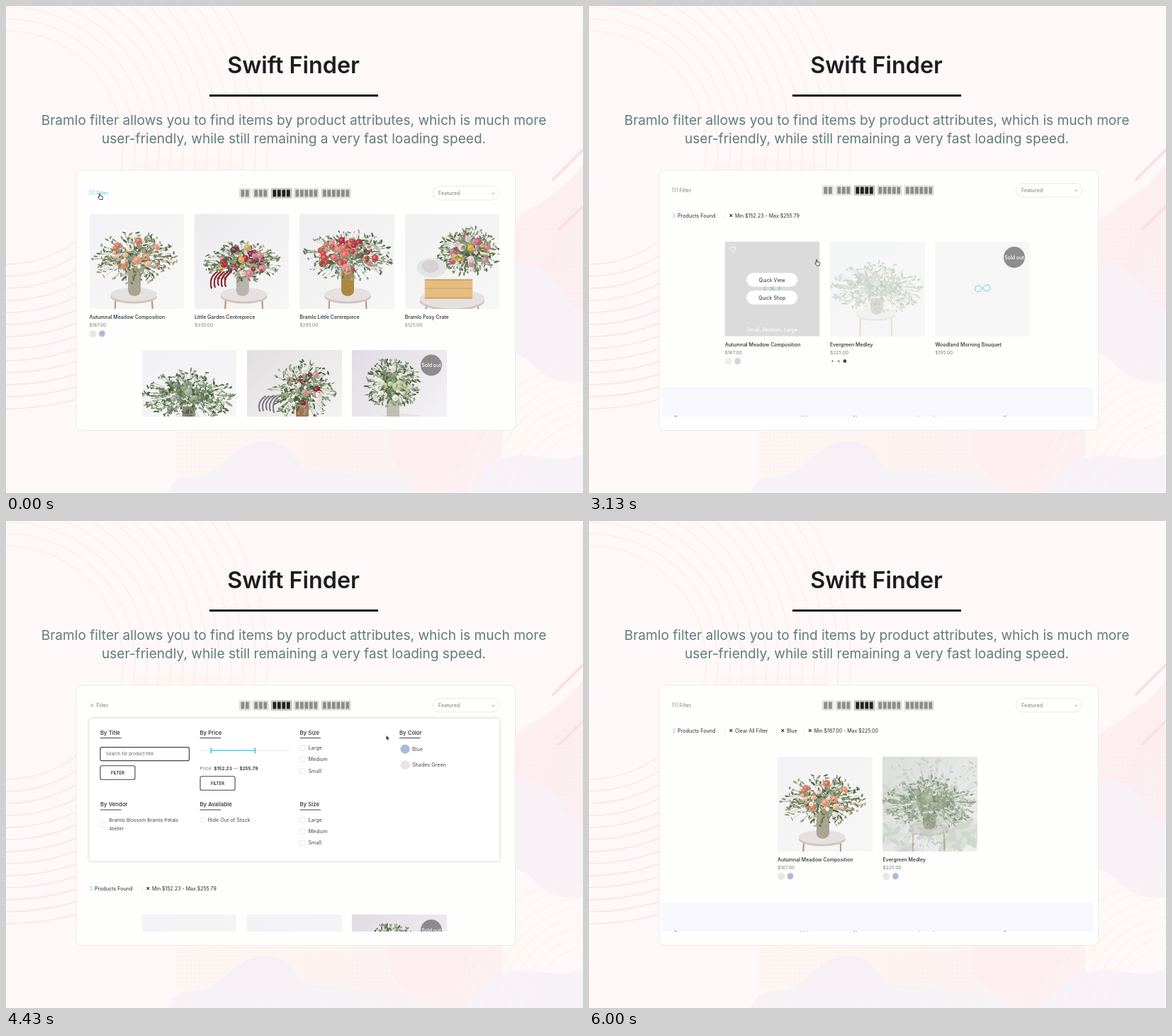
These frames come from a looping animation (814 by 688 pixels, 6.03 s). An HTML page with a canvas:

```html
<!DOCTYPE html>
<html lang="en">
<head>
<meta charset="utf-8">
<title>Swift Finder</title>
<style>
  html, body { margin: 0; width: 100%; height: 100%; overflow: hidden; background: #fef9f8; }
  svg, canvas { position: absolute; left: 0; top: 0; width: 814px; height: 688px; display: block; }
  text { font-family: Inter, sans-serif; text-anchor: middle; }
  .title { font-size: 32.3px; font-weight: 600; fill: #1d1d1f; }
  .lead { font-size: 19.1px; fill: #5f7d7b; }
</style>
</head>
<body>
<svg viewBox="0 0 814 688">
  <defs>
    <linearGradient id="rose" x1="0" y1="0" x2="1" y2="1">
      <stop offset="0" stop-color="#fdf4f2"/><stop offset=".45" stop-color="#fdeeef"/><stop offset="1" stop-color="#f9eff3"/>
    </linearGradient>
    <linearGradient id="peach" x1="0" x2="1">
      <stop offset="0" stop-color="#fdf6f2"/><stop offset=".6" stop-color="#fdf3f2"/><stop offset="1" stop-color="#fdeff2"/>
    </linearGradient>
    <linearGradient id="lilac" x1="0" y1="0" x2="0" y2="1">
      <stop offset="0" stop-color="#f6f0f6"/><stop offset="1" stop-color="#f8f3f6"/>
    </linearGradient>
    <linearGradient id="ringTone" gradientUnits="userSpaceOnUse" x1="0" y1="0" x2="0" y2="580">
      <stop offset="0" stop-color="#fdf1ee"/><stop offset=".4" stop-color="#fdefec"/><stop offset=".75" stop-color="#fce6e7"/>
    </linearGradient>
    <pattern id="dots" width="6" height="6" patternUnits="userSpaceOnUse">
      <circle cx="3" cy="3" r="1" fill="#f6cfd6" opacity=".22"/>
    </pattern>
  </defs>
  <rect width="814" height="688" fill="#fef9f8"/>
  <path d="M165 240C170 218 250 205 330 222L345 240Z" fill="#fef6f3"/>
  <path d="M700 330C715 285 770 285 814 224V470H700Z" fill="url(#rose)"/>
  <path d="M720 300H814V470H720Z" fill="url(#dots)"/>
  <path d="M700 370C740 355 775 380 785 402C795 425 800 425 814 428V530C780 535 760 525 745 508C730 492 715 490 700 490Z" fill="#f8f1f5"/>
  <path d="M240 590H700V688H240Z" fill="url(#peach)"/>
  <path d="M240 600H545V660H240Z" fill="url(#dots)"/>
  <path d="M541 590C538 650 555 668 600 668C650 668 640 640 675 620L700 590Z" fill="#fdeff1"/>
  <path d="M700 688V590H718C740 600 750 640 720 688Z" fill="#fef8f6"/>
  <path d="M228 688C238 655 270 672 295 655C325 630 345 608 380 617C415 628 405 656 435 656C470 655 490 668 530 664C560 662 570 685 600 688Z" fill="url(#lilac)"/>
  <path d="M620 688C660 690 665 645 705 637C745 628 780 650 814 632V688Z" fill="#f6f2f8"/>
  <path d="M772 245L816 201M781 315L816 281" stroke="#fbdfe3" stroke-width="4" stroke-linecap="round"/>
  <g id="rings" fill="none" stroke-width="2"></g>
  <rect x="99" y="232" width="619.5" height="367.5" rx="8" fill="#fefefd" stroke="#eeeaea"/>
  <text class="title" x="405.5" y="94.5">Swift Finder</text>
  <rect x="287" y="125" width="238" height="3" fill="#111"/>
  <text class="lead" x="406" y="167.5">Bramlo filter allows you to find items by product attributes, which is much more</text>
  <text class="lead" x="406" y="194.3">user-friendly, while still remaining a very fast loading speed.</text>
</svg>
<canvas id="stage"></canvas>
<script>
const LOOP = 6030, SIZE = 133.5, CYAN = '#56cfe8', INK = '#2b2b2b', GREY = '#7d7d7d';
const BLUE = '#a9bcd8', PALE = '#e6e6e6';
const FIRST = 2780, SECOND = 5220; // when each result list arrives

const rings = document.getElementById('rings');
function ring(x, y, r, color) {
  const c = document.createElementNS('http://www.w3.org/2000/svg', 'circle');
  Object.entries({ cx: x, cy: y, r, stroke: color }).forEach(([k, v]) => c.setAttribute(k, v));
  rings.append(c);
}
for (let r = 165; r < 380; r += 17) ring(0, 200, r, 'url(#ringTone)');
for (let r = 90; r < 200; r += 14) ring(830, 690, r, '#fcf4ee');

const cv = document.getElementById('stage'), dpr = window.devicePixelRatio || 1;
cv.width = 814 * dpr; cv.height = 688 * dpr;
const c = cv.getContext('2d');

const clamp = v => Math.max(0, Math.min(1, v));
const ramp = (t, a, b) => clamp((t - a) / (b - a));
const swing = u => .5 - Math.cos(u * Math.PI) / 2;
const mix = (a, b, u) => a + (b - a) * u;

function text(s, x, y, size = 7, color = INK, weight = 400, align = 'left') {
  c.font = `${weight} ${size}px Inter, sans-serif`;
  c.textAlign = align;
  c.fillStyle = color;
  c.fillText(s, x, y + size * .36);
  return x + c.measureText(s).width;
}
function box(x, y, w, h, r, fill, stroke, lw = 1) {
  c.beginPath(); c.roundRect(x, y, w, h, r);
  if (fill) { c.fillStyle = fill; c.fill(); }
  if (stroke) { c.strokeStyle = stroke; c.lineWidth = lw; c.stroke(); }
}
function dot(x, y, r, fill, g = c) {
  g.beginPath(); g.arc(x, y, r, 0, 7); g.fillStyle = fill; g.fill();
}
function oval(x, y, rx, ry, a, fill, g) {
  g.beginPath(); g.ellipse(x, y, rx, ry, a, 0, 7); g.fillStyle = fill; g.fill();
}
function path(d, x, y, color, lw = 1, fill) {
  const p = new Path2D(d);
  c.save(); c.translate(x, y);
  if (fill) { c.fillStyle = fill; c.fill(p); }
  if (color) { c.strokeStyle = color; c.lineWidth = lw; c.stroke(p); }
  c.restore();
}
function faded(alpha, draw) {
  if (alpha <= 0) return;
  c.save(); c.globalAlpha *= alpha; draw(); c.restore();
}

// ---- bouquets ----
function random(seed) { return () => (seed = seed * 16807 % 2147483647) / 2147483647; }

function bouquet({ seed, bg, at: [x, y], spread: [w, h], leaf, bloom, count, vase, stool, extra }) {
  const img = document.createElement('canvas');
  img.width = img.height = 268;
  const g = img.getContext('2d'), rnd = random(seed * 7919), pick = a => a[Math.floor(rnd() * a.length)];
  g.scale(2, 2);
  const sky = g.createLinearGradient(0, 0, 134, 134);
  sky.addColorStop(0, bg); sky.addColorStop(1, '#f7f7f7');
  g.fillStyle = sky; g.fillRect(0, 0, 134, 134);
  if (stool) {
    const [sx, sy, rx] = stool;
    g.strokeStyle = '#c29a76'; g.lineWidth = 2.2;
    for (const k of [-.78, .78]) { g.beginPath(); g.moveTo(sx + k * rx, sy + 4); g.lineTo(sx + k * rx * 1.03, 135); g.stroke(); }
    oval(sx, sy + 3, rx, rx * .3, 0, '#cfc6c0', g);
    oval(sx, sy, rx, rx * .3, 0, '#e6e1de', g);
  }
  if (vase) {
    const rim = y + h * .45;
    g.fillStyle = vase;
    g.beginPath(); g.roundRect(x - 9, rim, 18, stool[1] - rim + 2, [2, 2, 8, 8]); g.fill();
  }
  // a direction and reach inside the bouquet; crowds toward the middle
  const spot = (reach, crowd) => {
    const a = rnd() * 6.283, k = rnd() ** crowd * reach;
    return [x + Math.cos(a) * w * k, y + Math.sin(a) * h * k + Math.abs(Math.cos(a)) * k * 4, a];
  };
  const sprig = (reach, crowd) => {
    const [ex, ey, a] = spot(reach, crowd), color = pick(leaf);
    g.strokeStyle = color; g.lineWidth = .4;
    g.beginPath(); g.moveTo(mix(x, ex, .7), mix(y, ey, .7)); g.lineTo(ex, ey); g.stroke();
    oval(ex, ey, 1.4 + rnd() * 2.6, .6 + rnd() * .8, a + (rnd() - .5) * 2.6, color, g);
  };
  for (let i = 0; i < 330; i++) sprig(1, .85);
  for (let i = 0; i < 60; i++) { const [ex, ey] = spot(.5, .6); dot(ex, ey, 1.5 + rnd() * 2, pick(leaf), g); }
  for (let i = 0; i < count; i++) {
    const [bx, by] = spot(.66, .55), r = 2.2 + rnd() * 3.6;
    dot(bx, by, r, pick(bloom), g);
    dot(bx + r * .2, by + r * .2, r * .6, 'rgba(90,30,30,.13)', g);
    dot(bx - r * .2, by - r * .2, r * .4, 'rgba(255,255,255,.28)', g);
  }
  for (let i = 0; i < 40; i++) sprig(.7, .5);
  if (extra) extra(g, rnd);
  return img;
}

const stems = (g, rnd, color, x, y) => {
  g.strokeStyle = color; g.lineWidth = 2.2; g.lineCap = 'round';
  for (let i = 0; i < 5; i++) {
    const sx = x + i * 5;
    g.beginPath(); g.moveTo(sx + 8, y); g.quadraticCurveTo(sx - 4, y + 8, sx, y + 18 + rnd() * 6); g.stroke();
  }
};
const greens = ['#5c7450', '#7b8c66', '#4b6042', '#9aa786', '#8b9a80'];
const PEACH = bouquet({ seed: 3, bg: '#f3f3f5', at: [64, 61], spread: [60, 37], leaf: [...greens, '#b39a74'], bloom: ['#eaa581', '#dc7b62', '#f4e6d6', '#f6efe6', '#f2c6a4'], count: 26, vase: '#a9a592', stool: [63, 114, 33] });
const JEWEL = bouquet({ seed: 8, bg: '#ecebee', at: [68, 66], spread: [54, 30], leaf: greens, bloom: ['#7d2f5a', '#b8323f', '#e5b450', '#e0899b', '#efd9d0'], count: 42, vase: '#b9b2ad', stool: [70, 114, 33], extra: (g, r) => stems(g, r, '#8e2436', 24, 82) });
const CORAL = bouquet({ seed: 12, bg: '#efeef0', at: [68, 57], spread: [64, 36], leaf: [...greens, '#a3aaa6'], bloom: ['#d64b4b', '#e9736b', '#ec9a94', '#b93343'], count: 46, vase: '#ad8740', stool: [68, 114, 33] });
const CRATE = bouquet({ seed: 21, bg: '#f2f1f1', at: [90, 51], spread: [44, 34], leaf: greens, bloom: ['#d88ca3', '#e7b73b', '#c45f85', '#f0d5d8'], count: 26, stool: [67, 120, 46], extra(g) {
  oval(38, 76, 21, 14, 0, '#e6e3e4', g); oval(36, 74, 12, 9, 0, '#d6d2d4', g);
  g.fillStyle = '#e5bd81'; g.fillRect(28, 92, 68, 28);
  g.fillStyle = '#cfa367'; g.fillRect(28, 92, 68, 2); g.fillRect(28, 105, 68, 1); g.fillRect(28, 118, 68, 2);
} });
const GREEN = bouquet({ seed: 30, bg: '#f2f2f6', at: [66, 64], spread: [66, 36], leaf: greens, bloom: ['#8fa57c', '#6e8a66', '#a9b7a0', '#7f8f86'], count: 24, vase: '#8d8a78', stool: [65, 101, 28] });
const WINE = bouquet({ seed: 41, bg: '#e2dfe0', at: [78, 56], spread: [48, 42], leaf: greens, bloom: ['#f1e8df', '#8e2237', '#c99a94', '#f3efe8'], count: 24, vase: '#a66f4d', stool: [70, 112, 44], extra: (g, r) => stems(g, r, '#7c7a86', 18, 66) });
const WHITE = bouquet({ seed: 52, bg: '#e1dce4', at: [58, 46], spread: [40, 36], leaf: greens, bloom: ['#eef0e4', '#f6f5f0', '#c4d2a2'], count: 20, vase: '#bcc0b2', stool: [68, 103, 41] });
const ROSETTE = bouquet({ seed: 64, bg: '#d3d8cf', at: [67, 70], spread: [95, 90], leaf: ['#b6c3b0', '#a3b29d'], bloom: ['#b9c6b2'], count: 0, extra(g, rnd) {
  for (let i = 0; i < 15; i++) {
    const x = rnd() * 134, y = 50 + rnd() * 84, r = 10 + rnd() * 9;
    for (let k = 0; k < 18; k++) {
      const d = r * (1 - k / 18), a = k * 2.4;
      oval(x + Math.cos(a) * d, y + Math.sin(a) * d, r * .5, r * .22, a, k % 2 ? '#b9c7b3' : '#d2dacd', g);
    }
  }
} });

const AUTUMN = { img: PEACH, name: 'Autumnal Meadow Composition', price: '$167.00' };
const MEDLEY = { img: GREEN, name: 'Evergreen Medley', price: '$225.00' };
const WOODLAND = { img: WHITE, name: 'Woodland Morning Bouquet', price: '$195.00', sold: true };
const TOP = [AUTUMN,
  { img: JEWEL, name: 'Little Garden Centrepiece', price: '$335.00' },
  { img: CORAL, name: 'Bramlo Little Centrepiece', price: '$295.00' },
  { img: CRATE, name: 'Bramlo Posy Crate', price: '$125.00' }];
const LOWER = [MEDLEY, { img: WINE, name: 'Velvet Basket', price: '$215.00' }, WOODLAND];

// ---- timeline ----
function openness(t) {
  return swing(ramp(t, 350, 570)) - swing(ramp(t, 2270, 2445)) + swing(ramp(t, 3868, 4088)) - swing(ramp(t, 4700, 4875));
}
const isOpen = t => (t > 340 && t < 2270) || (t > 3868 && t < 4700);
const isLoading = t => (t >= 2270 && t < FIRST) || (t >= 4700 && t < SECOND);
function pageAlpha(t) {
  for (const [a, b] of [[2270, FIRST], [4700, SECOND]])
    if (t >= a && t < b + 110) return t < b ? mix(1, .13, ramp(t, a, a + 110)) : mix(.13, 1, ramp(t, b, b + 110));
  return 1;
}
const lowPrice = t => mix(125, 152.23, swing(ramp(t, 1660, 1830)));
const highPrice = t => mix(335, 255.79, swing(ramp(t, 960, 1280)));

// time, x, y, shape used until the next entry
const POINTER = [
  [0, 132, 264.5, 'hand'], [350, 132, 264.5, 'arrow'], [560, 228, 340, 'beam'], [600, 243, 350, 'beam'],
  [640, 268, 348, 'arrow'], [860, 397, 334, 'hand'], [960, 397, 334, 'hand'], [1280, 350.5, 334, 'hand'],
  [1530, 274, 334, 'hand'], [1660, 274, 334, 'hand'], [1830, 290, 334, 'hand'], [2040, 296, 384, 'hand'],
  [2300, 296, 384, 'hand'], [2900, 298, 386, 'hand'], [3130, 321, 358, 'hand'], [3165, 326, 350, 'arrow'],
  [3480, 132, 261, 'hand'], [3868, 132, 261, 'arrow'], [3960, 270, 316, 'arrow'], [4160, 384, 286, 'arrow'],
  [4300, 480, 266, 'arrow'], [4500, 566, 322, 'hand'], [4720, 566, 322, 'arrow'], [4830, 529.5, 366, 'arrow'],
  [5300, 520, 378, 'arrow'], [5930, 530, 372, 'none']];

function pointer(t) {
  let i = POINTER.length - 1;
  while (POINTER[i][0] > t) i--;
  const [a, x, y, shape] = POINTER[i], [b, x2, y2] = POINTER[i + 1] || [LOOP, x, y];
  const u = ramp(t, a, b), px = mix(x, x2, u), py = mix(y, y2, u);
  if (shape === 'hand') path('M2 8.5L0 5.4 .8 4.7 1.8 5.6V1A.7 .7 0 0 1 3.2 1V3.7L6.6 4.4Q7.3 4.7 7.1 5.5L6.4 9H2.6Z', px - 2.4, py, '#333', .9, '#fff');
  if (shape === 'arrow') path('M0 0V6.6L1.6 5.2 2.7 7.6 3.8 7.1 2.7 4.8 4.8 4.8Z', px, py, '#fff', .4, '#222');
  if (shape === 'beam') path('M-2-3.5Q0-3.5 0-2.5Q0-3.5 2-3.5M0-3V3M-2 3.5Q0 3.5 0 2.5Q0 3.5 2 3.5', px, py, '#555', .9);
}

// ---- page parts ----
function toolbar(t, y) {
  const hot = t < 400 || (t > 3470 && t < 3995), col = hot ? CYAN : GREY;
  if (isOpen(t)) path('M-2.3-2.3L2.3 2.3M2.3-2.3L-2.3 2.3', 121.3, y, col, .7);
  else path('M-3-3.5V-1.5M-3 0V3.5M0-3.5V.8M0 2.2V3.5M3-3.5V-2M3-.6V3.5M-4-.8H-2M-1 1.5H1M2-1.3H4', 121.3, y - 1, col, .6);
  text('Filter', 127.5, y, 7, col);
  [329.5, 348.5, 374.5, 406.5, 445].forEach((x, i) => {
    const n = i + 2, on = n === 4;
    box(x, y - 6.5, 2 + 6.5 * n, 13, 0, '#f0f0f0', on ? '#8b8b8b' : '#cfcfcf', .8);
    for (let k = 0; k < n; k++) box(x + 1.8 + k * 6.5, y - 5, 5, 10, 0, on ? '#222' : '#8d8d8d');
  });
  box(602.5, y - 10, 93.5, 19.5, 10, null, '#e9e9e9');
  text('Featured', 610, y, 7.2, GREY);
  path('M-2-1L0 1L2-1', 687.5, y + .3, GREY, .8);
}

function heading(s, x, y) {
  text(s, x, y, 7.8, INK, 500);
  box(x, y + 7.2, 29.5, 1, 0, '#444');
}
function option(s, x, y, r = 1) {
  box(x + .5, y - 3.5, 7.5, 7.5, r, '#fff', '#e2e2e2', .8);
  text(s, x + (r > 1 ? 11 : 12.5), y, 7.2, '#4a4a4a');
}
function button(x, y, hot) {
  box(x, y, 49, 19.5, 2, hot ? CYAN : null, hot ? CYAN : '#444', 1.1);
  text('FILTER', x + 24.5, y + 10, 5.8, hot ? '#fff' : INK, 600, 'center');
}
function panel(t, s, top) {
  if (s < .01) return;
  const h = 201 * s;
  c.save();
  c.shadowColor = 'rgba(0,0,0,.22)'; c.shadowBlur = 4 * dpr;
  box(117.5, top, 578.5, h, 1, '#fff');
  c.restore();
  c.save();
  c.beginPath(); c.rect(117.5, top, 578.5, h); c.clip();
  c.translate(0, top - 290 - 13 * (1 - s));

  heading('By Title', 133, 309.5);
  box(133, 330.5, 125.5, 19, 2.5, null, '#444', 1.2);
  text('Search for product title', 141, 340, 6.2, '#666');
  button(133, 356.5, false);

  heading('By Price', 273.5, 309.5);
  const lo = lowPrice(t), hi = highPrice(t), at = v => 273 + (v - 125) * .6;
  box(273, 334.5, 126, 1, 0, '#e3e3e3');
  box(at(lo), 334.4, at(hi) - at(lo), 1.4, 0, CYAN);
  for (const v of [lo, hi]) box(at(v) - 1, 331, 2, 8, 0, CYAN);
  let x = text('Price: ', 273.5, 360, 6.6, '#777');
  x = text('$' + lo.toFixed(2), x, 360, 6.6, INK, 600);
  x = text(' — ', x, 360, 6.6, '#777');
  text('$' + hi.toFixed(2), x, 360, 6.6, INK, 600);
  button(274, 371.5, t > 1985 && t < 2600);

  [309.5, 411].forEach(y => {
    heading('By Size', 414.5, y);
    ['Large', 'Medium', 'Small'].forEach((s, i) => option(s, 414, y + 21.8 + i * 16.3));
  });

  heading('By Color', 555, 309.5);
  dot(563, 333, 6.5, BLUE); text('Blue', 573, 333, 7.2, t > 4450 ? CYAN : '#4a4a4a');
  dot(563, 355.5, 6.5, PALE); text('Shades Green', 573, 355.5, 7.2, '#4a4a4a');

  heading('By Vendor', 133, 411);
  option('', 132.5, 439);
  text('Bramlo Blossom Bramlo Petals', 145.5, 433, 6.8, '#4a4a4a');
  text('Atelier', 145.5, 445.3, 6.8, '#4a4a4a');
  heading('By Available', 273.5, 411);
  option('Hide Out of Stock', 273.5, 433, 3);
  c.restore();
}

function swatches(x, y, alpha = 1) {
  faded(alpha, () => {
    [PALE, BLUE].forEach((col, i) => {
      dot(x + 5 + i * 13, y, 5.2, '#dcdcdc'); dot(x + 5 + i * 13, y, 4.7, '#fff'); dot(x + 5 + i * 13, y, 4.2, col);
    });
  });
}
function product(p, x, y, shown = 1) {
  if (shown < 1) {
    box(x, y, SIZE, SIZE, 0, '#f5f6f5');
    faded(1 - shown * 2, () =>
      path('M0 0C3-5 6-6 9-4C12-1 10 4 6 4C2 4-2-4-6-4C-11-4-12 2-9 4C-6 6-3 4 0 0', x + SIZE / 2, y + 66, CYAN, 1));
  }
  faded(shown, () => c.drawImage(p.img, x, y, SIZE, SIZE));
  if (p.sold) {
    dot(x + 111.5, y + 22, 15, 'rgba(125,125,125,.87)');
    text('Sold out', x + 111.5, y + 22, 7, '#fff', 500, 'center');
  }
  text(p.name, x, y + 145.5, 7, INK, 500);
  text(p.price, x, y + 156.2, 6.6, GREY);
}
function hover(x, y) {
  box(x, y, SIZE, SIZE, 0, 'rgba(0,0,0,.11)');
  path('M0 4C-7-1-4-5 0-2C4-5 7-1 0 4', x + 11, y + 10.5, '#fff', 1);
  ['Quick View', 'Quick Shop'].forEach((s, i) => {
    box(x + 30.5, y + 44 + i * 25, 72, 19.5, 10, '#fff');
    text(s, x + 66.5, y + 54 + i * 25, 7, INK, 400, 'center');
  });
  text('Small, Medium, Large', x + 66.5, y + 124.5, 7, '#fff', 400, 'center');
}
function found(n, tags, y) {
  text(String(n), 117.5, y, 7.2, CYAN);
  text('Products Found', 125, y, 7.2, INK);
  for (const [x, s] of tags) {
    box(x - 7, y - 5, .6, 10, 0, '#e8e8e8');
    path('M-1.8-1.8L1.8 1.8M1.8-1.8L-1.8 1.8', x + 2.3, y, INK, 1.1);
    text(s, x + 8, y, 7, INK);
  }
}
function band(y) {
  box(103, y, 608, 60, 0, '#f7f7fd');
  [120, 298, 372, 462, 584].forEach((x, i) => text(['Pages', 'Help', 'About', 'Journal', 'Contact'][i], x, y + 43, 7, '#555'));
}

function results(t, shift, top) {
  const x3 = [191.7, 340, 488.4], x2 = [266, 414.4];
  if (t < FIRST) {
    TOP.forEach((p, i) => product(p, 117.5 + i * 148.4, top));
    swatches(117.5, top + 168.7);
    LOWER.forEach((p, i) => product(p, x3[i], top + 191.5));
  } else if (t < SECOND) {
    found(3, [[198, 'Min $152.23 - Max $255.79']], 296 + shift);
    [AUTUMN, MEDLEY, WOODLAND].forEach((p, i) => product(p, x3[i], top, ramp(t, [3150, 3060, 3180][i], [3400, 3350, 3450][i])));
    swatches(x3[0], top + 168.7, mix(.5, 1, ramp(t, 3100, 3300)));
    if (t < 3300) [1, 2, 2.4].forEach((r, i) => dot(x3[1] + 3.5 + i * 8.7, top + 168.7, r, i === 1 ? '#bbb' : '#444'));
    else swatches(x3[1], top + 168.7, ramp(t, 3300, 3400));
    faded(ramp(t, 2800, 2900) * (1 - ramp(t, 3165, 3290)), () => hover(x3[0], top));
    band(top + 206);
  } else {
    found(2, [[198, 'Clear All Filter'], [271, 'Blue'], [309.5, 'Min $167.00 - Max $225.00']], 296 + shift);
    [AUTUMN, MEDLEY].forEach((p, i) => {
      product(p, x2[i], top, ramp(t, 5480 + i * 60, 5780 + i * 60));
      swatches(x2[i], top + 168.7, mix(.4, 1, ramp(t, 5600, 5990)));
    });
    faded(ramp(t, 5900, 6100), () => {
      c.drawImage(ROSETTE, x2[1], top, SIZE, SIZE);
      box(x2[1], top, SIZE, SIZE, 0, 'rgba(0,0,0,.06)');
    });
    band(top + 206);
  }
}

function draw(t) {
  const s = openness(t), start = t < FIRST, busy = isLoading(t), alpha = pageAlpha(t);
  const shift = mix(0, start ? 232 : 223, s) + (busy ? 14 : 0);
  const top = (start ? 294 : 333) + shift + (busy ? 50 : 0);
  c.setTransform(dpr, 0, 0, dpr, 0, 0);
  c.clearRect(0, 0, 814, 688);
  c.save();
  c.beginPath(); c.rect(100, 233, 617, 347); c.clip();
  faded(alpha, () => {
    toolbar(t, start ? 264.5 : 260.5);
    results(t, shift, top);
  });
  panel(t, s, start ? 280 + 10 * s : 274.2 + 5 * s);
  if (busy) [.3, -.8, 1.6].forEach((a, i) =>
    dot(394 + i * 12.5, top - 53, 1.9 * Math.max(0, Math.sin((t - 4830) / 160 + a)), '#333'));
  pointer(t);
  c.restore();
}

function tick() {
  draw(performance.now() % LOOP);
  requestAnimationFrame(tick);
}
tick();
</script>
</body>
</html>
```
